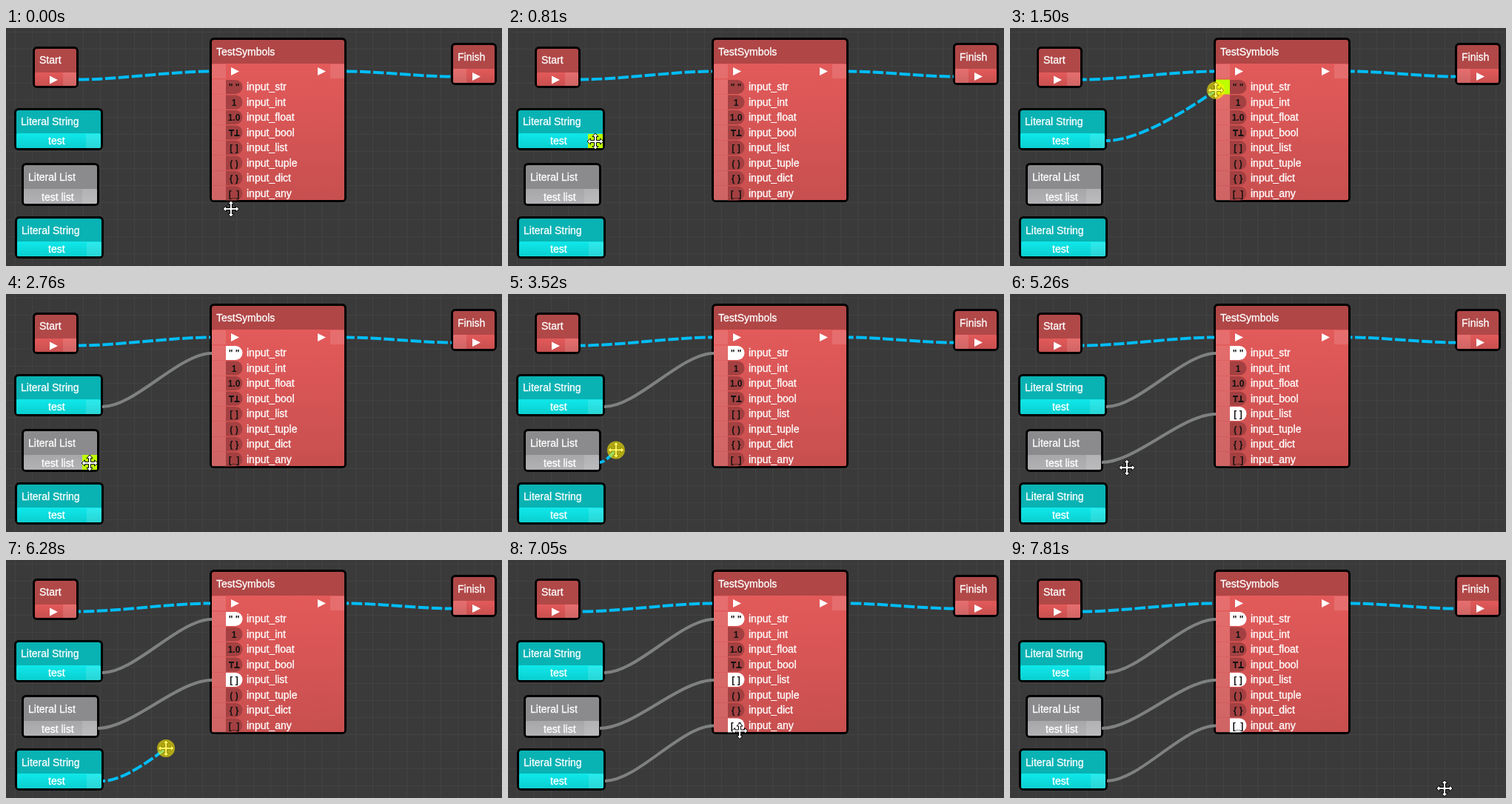
An HTML page that plays this animation: 670 px wide and 321 px high, repeating every 7.88 s.

```html
<!DOCTYPE html>
<html lang="en">
<head>
<meta charset="utf-8">
<title>Node editor</title>
<style>
html, body { margin: 0; width: 100%; height: 100%; overflow: hidden; background: #3a3a3a; }
svg { display: block; }
text { font: 14px "Liberation Sans", Arial, sans-serif; fill: #fff; stroke: #fff; stroke-width: .3; }
.sym { font-size: 12px; font-weight: bold; fill: #111; stroke: none; text-anchor: middle; }
.wire { fill: none; stroke: #7f8181; stroke-width: 4; }
.flow { stroke: #00bdf7; stroke-dasharray: 14.5 3.5; animation: flow 985ms linear infinite; }
.port { fill: #fff; fill-opacity: .12; }
.port.hot { fill: #beff00; fill-opacity: 1; }
.pin { fill: #a44041; }
.pin.on { fill: #fff; }
@keyframes flow { from { stroke-dashoffset: 18; } to { stroke-dashoffset: 0; } }
</style>
</head>
<body>
<svg id="stage" width="670" height="321" viewBox="0 0 670 321">
  <defs>
    <pattern id="grid" width="23" height="23" patternUnits="userSpaceOnUse" x="12" y="5">
      <path d="M.5 0V23M0 .5H23" stroke="#424242" fill="none"/>
    </pattern>
    <linearGradient id="red" x2="0" y2="1"><stop stop-color="#e35a5a"/><stop offset="1" stop-color="#c84f4f"/></linearGradient>
    <linearGradient id="cyan" x2="0" y2="1"><stop stop-color="#0fe8ea"/><stop offset="1" stop-color="#0bcfd0"/></linearGradient>
    <linearGradient id="grey" x2="0" y2="1"><stop stop-color="#a7a7aa"/><stop offset="1" stop-color="#b2b2b5"/></linearGradient>
  </defs>
  <rect width="670" height="321" fill="url(#grid)"/>
  <g id="nodes"></g>
  <g id="wires"></g>
  <g id="cursor">
    <path fill="#fff" stroke="#000" stroke-linejoin="round"
      d="M0-11 4-6.5H1.5V-1.5H6.5V-4L11 0 6.5 4V1.5H1.5V6.5H4L0 11-4 6.5H-1.5V1.5H-6.5V4L-11 0-6.5-4V-1.5H-1.5V-6.5H-4Z"/>
    <circle id="press" r="12" fill="#fff000" fill-opacity=".6"/>
  </g>
</svg>
<script>
const LOOP = 7880;
const $ = id => document.getElementById(id);
const nodes = $('nodes'), wires = $('wires');

function add(parent, tag, attrs, text) {
  const el = document.createElementNS('http://www.w3.org/2000/svg', tag);
  for (const key in attrs) el.setAttribute(key, attrs[key]);
  if (text) el.textContent = text;
  parent.append(el);
  return el;
}
const rect = (x, y, width, height, attrs) => add(nodes, 'rect', { x, y, width, height, ...attrs });
const label = (x, y, text, cls = '') => add(nodes, 'text', { x, y, class: cls }, text);
const port = (x, y, w = 19, h = 19) => rect(x, y, w, h, { class: 'port' });
const arrow = (x, y) => add(nodes, 'path', { d: `M${x} ${y - 5.5}l11 5.5-11 5.5Z`, fill: '#fff' });

// Outer box, height down to the header's end, header colour, body gradient, title and its baseline
function node(x, y, w, h, head, dark, body, title, base) {
  rect(x, y, w, h, { rx: 6, fill: '#000' });
  rect(x + 3, y + 3, w - 6, h - 6, { rx: 3, fill: dark });
  rect(x + 3, y + head, w - 6, h - head - 3, { rx: 2, fill: `url(#${body})` });
  label(x + 9, base, title);
}

function wire(x1, y1, x2, y2, flow) {
  const bend = (x2 - x1) * .3;
  return add(wires, 'path', {
    class: flow ? 'wire flow' : 'wire',
    d: `M${x1} ${y1}C${x1 + bend} ${y1} ${x2 - bend} ${y2} ${x2} ${y2}`
  });
}

node(36, 25, 62, 56, 35, '#b14848', 'red', 'Start', 48);
port(77, 60, 18, 18);
arrow(59, 70);

node(601, 20, 62, 57, 35, '#b14848', 'red', 'Finish', 44);
port(604, 55, 18, 19);
arrow(630, 65.5);

node(275, 13, 185, 222, 35, '#b04646', 'red', 'TestSymbols', 37);
port(278, 49);
port(438, 49);
arrow(304, 58.5);
arrow(421, 58.5);

const inputs = [['str', '" "'], ['int', '1'], ['float', '1.0'], ['bool', ''],
  ['list', '[ ]'], ['tuple', '( )'], ['dict', '{ }'], ['any', '[_]']];
const rows = inputs.map(([name, sym], i) => {
  const y = 79.5 + i * 20.5;
  const cell = port(278, y - 10, 19, 20);
  const pin = add(nodes, 'path', { class: 'pin', d: `M297 ${y - 9.5}h13a9.5 9.5 0 0 1 0 19h-13Z` });
  if (sym) label(308, y + 4.5, sym, 'sym');
  else add(nodes, 'path', {
    d: `M301 ${y - 3}h7M304.5 ${y - 3}v8M308.5 ${y + 4}h7M312 ${y + 4}v-8`,
    stroke: '#111', 'stroke-width': 1.8
  });
  label(325, y + 4.5, 'input_' + name);
  return { cell, pin };
});

const teal = '#09b2b3';
node(11, 108, 120, 57, 34, teal, 'cyan', 'Literal String', 131);
label(57, 157, 'test');
const out1 = port(108, 143, 20);
node(21, 182, 105, 58, 35, '#8b8a8c', 'grey', 'Literal List', 206);
label(48, 233, 'test list');
const out2 = port(103, 217, 20, 20);
node(12, 254, 120, 57, 34, teal, 'cyan', 'Literal String', 278);
label(57, 303, 'test');
const out3 = port(109, 289, 20);

wire(98, 69.5, 276, 58.5, true);
wire(460, 58.5, 602, 65.5, true);

// Each link: hover on the output, press, hover on the input, release
const links = [
  { out: out1, x: 130, y: 152, row: 0, hover: 700, press: 950, over: 1480, drop: 1710 },
  { out: out2, x: 124, y: 227, row: 4, hover: 2560, press: 3330, over: 4330, drop: 4560 },
  { out: out3, x: 131, y: 298, row: 7, hover: 5620, press: 5930, over: 6700, drop: 6960 }
];
for (const k of links) k.wire = wire(k.x, k.y, 278, 80 + k.row * 20.5);
const drag = add(wires, 'path', { class: 'wire flow' });

// Pointer path: time, x, y
const path = [
  [0, 304, 244], [100, 296, 240], [720, 118, 153], [950, 118, 153],
  [1500, 278, 84], [1750, 280, 83], [2600, 113, 228], [3330, 113, 228],
  [4230, 268, 145], [4400, 284, 161], [4600, 284, 161], [5260, 158, 234],
  [5650, 119, 298], [5920, 119, 298], [6280, 216, 254], [6750, 284, 223],
  [6980, 284, 223], [7460, 480, 274], [7720, 587, 308], [LOOP, 587, 308]
];
function pointer(t) {
  const i = path.findIndex(p => p[0] > t);
  const [t0, x0, y0] = path[i - 1], [t1, x1, y1] = path[i];
  const f = (t - t0) / (t1 - t0);
  return [x0 + (x1 - x0) * f, y0 + (y1 - y0) * f];
}

const show = (el, on) => el.setAttribute('visibility', on ? 'visible' : 'hidden');

function draw(t) {
  const [x, y] = pointer(t);
  $('cursor').setAttribute('transform', `translate(${x.toFixed(1)} ${y.toFixed(1)})`);
  let held = null;
  for (const k of links) {
    const { cell, pin } = rows[k.row];
    const joined = t >= k.drop;
    if (t >= k.press && !joined) held = k;
    k.out.classList.toggle('hot', t >= k.hover && t < k.press);
    cell.classList.toggle('hot', t >= k.over && !joined);
    pin.classList.toggle('on', joined);
    show(k.wire, joined);
  }
  show(drag, held);
  show($('press'), held);
  if (held) drag.setAttribute('d', `M${held.x} ${held.y}Q${held.x + (x - held.x) / 3} ${held.y} ${x} ${y}`);
}

const start = performance.now();
function tick() {
  draw((performance.now() - start) % LOOP);
  requestAnimationFrame(tick);
}
tick();
</script>
</body>
</html>
```
